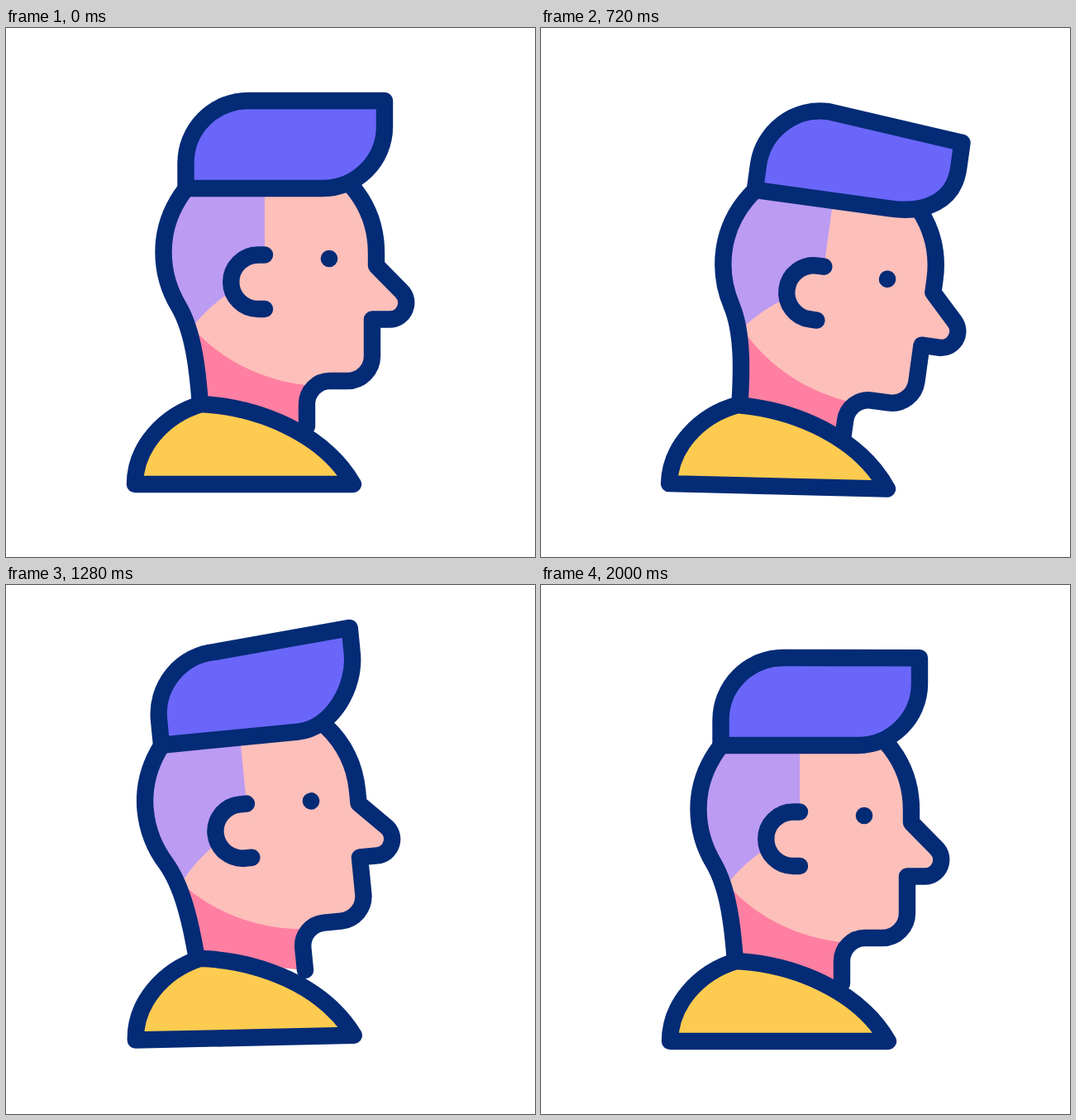
These frames come from a looping animation (640x640 px, 2.08 s). An HTML page:

```html
<!DOCTYPE html>
<html lang="en">
<head>
<meta charset="utf-8">
<title>Nodding man</title>
<style>
html, body { margin: 0; width: 100%; height: 100%; overflow: hidden; background: #fff; }
svg { display: block; width: 100%; height: 100%; }
.line { stroke: #032b76; stroke-width: 20.4; stroke-linecap: round; stroke-linejoin: round; }
</style>
</head>
<body>
<svg viewBox="0 0 640 640">
  <defs>
    <path id="face" d="M235 456C232 415 227 368 209 337C197 317 190.5 295 190.5 271
      C190.5 243 200 217 218 194L228 184H405L418 191C437 213 448 241 448 272V287.5L478 318
      A20 20 0 0 1 464 352.5H443V397A30 30 0 0 1 413 427H392A28 28 0 0 0 364 455V482"/>
    <clipPath id="skin"><use href="#face"/></clipPath>
  </defs>
  <g id="body">
    <g id="head">
      <g clip-path="url(#skin)">
        <rect x="170" y="170" width="330" height="340" fill="#fdbfba"/>
        <path d="M170 180H313V300L290 309Q252 328 226 361L170 380Z" fill="#bc9bf2"/>
        <path d="M224 361C260 402 312 428 372 433V510H224Z" fill="#ff7fa2"/>
      </g>
      <use href="#face" class="line" fill="none"/>
      <path class="line" d="M313 274.5H305A32.7 32.7 0 0 0 305 340H313" fill="#fdbfba"/>
      <circle cx="391" cy="279" r="10.3" fill="#032b76"/>
      <path id="hair" class="line" fill="#6a66f9"/>
    </g>
    <path class="line" fill="#fdcb50"
      d="M156 552C156 508 190 469 236 455C306 459 384 490 420 552Z"/>
  </g>
</svg>
<script>
const LOOP = 2080, STEP = 40;
const el = id => document.getElementById(id);

// Swings from rest through each peak and back to rest, one beat per move
function swing(t, start, beat, ...peaks) {
  const n = Math.max(0, (t - start) / beat), i = Math.floor(n);
  const a = peaks[i - 1] || 0, b = peaks[i] || 0;
  return a + (b - a) * (1 - Math.cos(Math.PI * (n - i))) / 2;
}

function draw(now) {
  const t = Math.floor(now % LOOP / STEP) * STEP;
  // the head follows the body, and the hair follows the head
  const lean = swing(t, 40, 470, 5.5, -4.3);
  const nod = swing(t, 130, 480, 8.3, -6.6);
  const droop = swing(t, 240, 450, 15.5, -20, 12);
  el('body').setAttribute('transform', `rotate(${lean} ${lean > 0 ? 190 : 90} 513)`);
  el('head').setAttribute('transform', `rotate(${nod} 232 491)`);
  el('hair').setAttribute('d', `M217.5 194V163.5A75.5 75.5 0 0 1 293 88L458 ${88 + droop}
    V${119 + droop}C458 ${160.4 + droop} 424.4 194 383 194Z`);
}

const start = performance.now();
function tick() {
  draw(performance.now() - start);
  requestAnimationFrame(tick);
}
tick();
</script>
</body>
</html>
```
